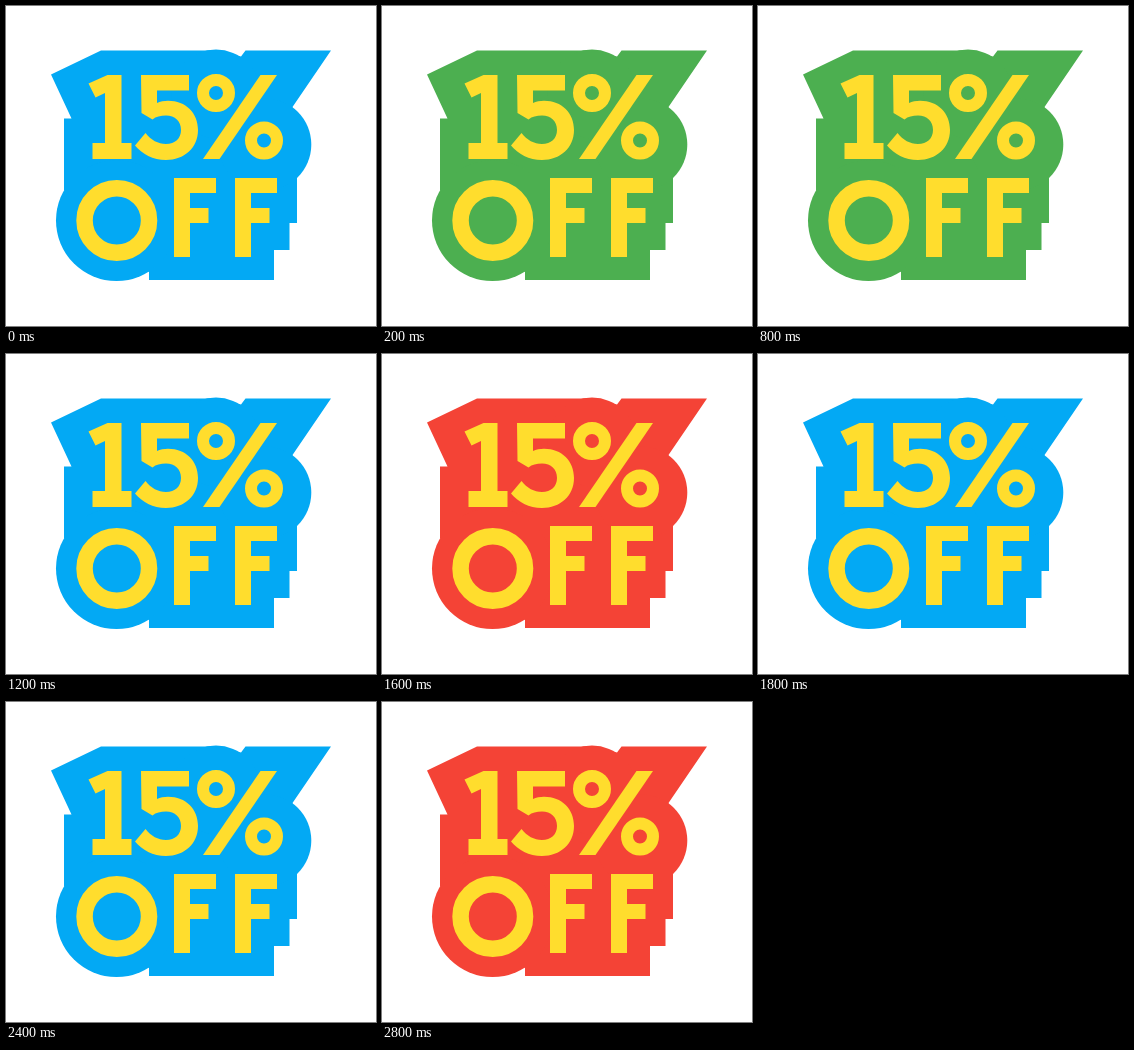
An HTML page for the animation above (3000 ms loop, 370 by 320 pixels).

```html
<!DOCTYPE html>
<html lang="en">
<head>
<meta charset="utf-8">
<title>15% OFF</title>
<style>
  html, body { margin: 0; width: 100%; height: 100%; overflow: hidden; background: #fff; }
  svg { display: block; width: 370px; height: 320px; }
  .backing { fill: #03a9f4; animation: flash 600ms step-end infinite; }
  .lettering { fill: #ffdd2d; }
  .ring { fill: none; stroke: #ffdd2d; }
  @keyframes flash {
    0% { fill: #03a9f4; }
    33.3333% { fill: #4caf50; }
    66.6667% { fill: #f44336; }
  }
</style>
</head>
<body>
<svg viewBox="0 0 370 320" role="img" aria-label="15% OFF">
  <defs>
    <path id="letter-f" d="M0 172H42V187H16V202H34.5V217H16V251H0Z"/>
  </defs>

  <g class="backing">
    <path d="M45 68.5L95 44.5H210L235 50.5L239.5 44.5H325L286.5 101L291 172V217H283.500V244H268V274H143V266L58 184V112.500H65.500Z"/>
    <circle cx="210" cy="88" r="44.500"/>
    <circle cx="259" cy="138.500" r="46.300"/>
    <circle cx="110.500" cy="214.500" r="60.500"/>
  </g>

  <g class="lettering">
    <path d="M101.500 69H115.500V137H125.500V153H86.500V137H99V87L89.500 91.500L82.500 77.500Z"/>
    <path d="M135 69H183V84.500H151V97C154 95.500 158 94.700 162 94.700C180 94.700 192 107 192 124C192 142 178 154 160 154C147 154 136 148 129 139.500L139.500 127C145 134 152 138 160 138C169 138 175 132.500 175 124C175 115 169 109.500 160 109.500C154.500 109.500 150 110.500 146.500 113.500L135.500 107Z"/>
    <path d="M254.500 69H271L213.500 153H197Z"/>
    <use href="#letter-f" x="168"/>
    <use href="#letter-f" x="229"/>
  </g>

  <g class="ring">
    <circle cx="210" cy="87" r="13" stroke-width="12"/>
    <circle cx="258" cy="134.500" r="13" stroke-width="12"/>
    <circle cx="110.800" cy="214.500" r="32.250" stroke-width="16.500"/>
  </g>
</svg>
</body>
</html>
```
